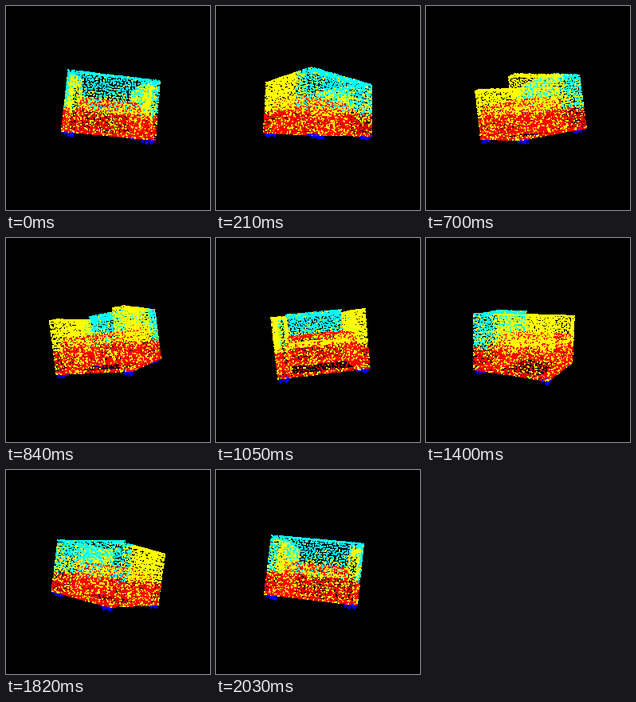
A matplotlib script for the animation above (2.1 s loop, 256x256 px).

```python
import numpy as np
import matplotlib.pyplot as plt
from matplotlib.animation import FuncAnimation

SIZE, DPI, FRAMES, STEP_MS = 256, 100, 30, 70
CYAN, YELLOW, RED, BLUE = range(4)
PALETTE = np.array([[0, 1, 1], [1, 1, 0], [1, 0, 0], [0, 0, 1]], float)

# Sofa proportions, half-width = 1
C = 0.92                    # half-depth
INNER, BACK = 0.75, 0.42    # inner side of the arms, front of the backrest
TOP, SEAT, BASE, RIDGE = 0.67, 0.18, -0.62, 0.76
SPACING = 0.059

# Camera and lean of the body against the turning axis
FOCAL, DIST = 285, 5.8
LEAN_X, LEAN_Z = 0.105, -0.076
YAW = np.radians(5.3)

rng = np.random.default_rng(7)
points, labels = [], []


def panel(origin, u, v, paint):
    """Scatter points evenly over a parallelogram and label them."""
    origin, u, v = (np.array(w, float) for w in (origin, u, v))
    n, m = (max(2, round(np.linalg.norm(w) / SPACING)) for w in (u, v))
    i, j = np.meshgrid(np.arange(n + 1), np.arange(m + 1))
    s = np.clip((i + rng.uniform(-.36, .36, i.shape)) / n, 0, 1).ravel()
    t = np.clip((j + rng.uniform(-.36, .36, j.shape)) / m, 0, 1).ravel()
    p = origin + s[:, None] * u + t[:, None] * v
    points.append(p)
    labels.append(paint(*p.T))


def mix(x, first, second, share):
    """Label `second` for the given share of the points."""
    return np.where(rng.random(len(x)) < share, second, first)


def over_base(x, y, upper, edge=-0.1):
    low = y < edge + rng.normal(0, .04, len(y))
    return np.where(low, mix(x, RED, YELLOW, .3), upper)


def rear(x, y, z):
    side = (abs(x) > .7) & (abs(x) < .95) & (y < .6)
    share = np.where(y < .28, .6, np.where(side, .5, .08))
    return over_base(x, y, mix(x, CYAN, YELLOW, share))


def flank(x, y, z):
    upper = np.where(z > BACK, mix(x, CYAN, YELLOW, .25), YELLOW)
    return over_base(x, y, upper)


def front(x, y, z):
    return over_base(x, y, mix(x, YELLOW, RED, .3), 0.0)


def seat(x, y, z):
    return mix(x, RED, YELLOW, .25)


def rest(x, y, z):
    upper = mix(x, CYAN, YELLOW, np.where(y < .35, .3, .06))
    return over_base(x, y, upper, SEAT)


def arm_top(x, y, z):
    return np.where(z > BACK, CYAN, YELLOW)


def arm(x, y, z):
    return over_base(x, y, np.full(len(x), YELLOW), 0.1)


def cushion(x, y, z):
    return mix(x, YELLOW, RED, .1)


HEIGHT, WIDTH, ARM = TOP - BASE, 2 * INNER, 1 - INNER
panel((-1, BASE, C), (2, 0, 0), (0, HEIGHT, 0), rear)
panel((-INNER, BASE, -C), (WIDTH, 0, 0), (0, SEAT - BASE, 0), front)
panel((-INNER, SEAT, -C), (WIDTH, 0, 0), (0, 0, C + BACK), seat)
panel((-INNER, 0, -C), (WIDTH, 0, 0), (0, 0, C + BACK), cushion)
panel((-INNER, BASE, BACK), (WIDTH, 0, 0), (0, RIDGE - BASE, 0), rest)
panel((-INNER, RIDGE, BACK), (WIDTH, 0, 0), (0, TOP - RIDGE, C - BACK), rest)
# The underside is a frame, open in the middle
panel((-INNER, BASE, BACK), (WIDTH, 0, 0), (0, 0, C - BACK), seat)
panel((-INNER, BASE, -C), (WIDTH, 0, 0), (0, 0, ARM), seat)
for side in (-1, 1):
    across = (-side * ARM, 0, 0)
    panel((side, BASE, -C), (0, 0, 2 * C), (0, HEIGHT, 0), flank)
    panel((side, BASE, -C), across, (0, HEIGHT, 0), flank)
    panel((side, TOP, -C), across, (0, 0, 2 * C), arm_top)
    panel((side, BASE, -C), across, (0, 0, 2 * C), seat)
    panel((side * INNER, BASE, -C), (0, 0, C + BACK), (0, HEIGHT, 0), arm)
    for end in (-1, 1):
        leg = rng.uniform((.74, -.72, .74), (.98, -.62, .91), (36, 3))
        points.append(leg * (side, 1, end))
        labels.append(np.full(len(leg), BLUE))

x, y, z = np.concatenate(points).T
colors = PALETTE[np.concatenate(labels)]
x, y, z = x + LEAN_X * y, y - LEAN_X * x - LEAN_Z * z, z + LEAN_Z * y


def project(angle):
    """Screen positions, far to near, and the drawing order."""
    across = x * np.cos(angle) + z * np.sin(angle)
    toward = z * np.cos(angle) - x * np.sin(angle)
    scale = FOCAL / (DIST - toward)
    order = np.argsort(toward)
    xy = np.column_stack((128 + scale * across, 130 - scale * y))
    return np.round(xy)[order], order


fig = plt.figure(figsize=(SIZE / DPI, SIZE / DPI), dpi=DPI, facecolor="black")
ax = fig.add_axes([0, 0, 1, 1])
ax.set(xlim=(0, SIZE), ylim=(SIZE, 0))
ax.axis("off")
cloud = ax.scatter(x, y, s=(2 * 72 / DPI) ** 2, marker="s", c=colors,
                   linewidths=0, antialiased=False)


def update(i):
    xy, order = project(YAW + 2 * np.pi * i / FRAMES)
    cloud.set_offsets(xy)
    cloud.set_facecolor(colors[order])
    return (cloud,)


anim = FuncAnimation(fig, update, frames=FRAMES, interval=STEP_MS,
                     repeat=True, repeat_delay=0, blit=False)
plt.show()
```
